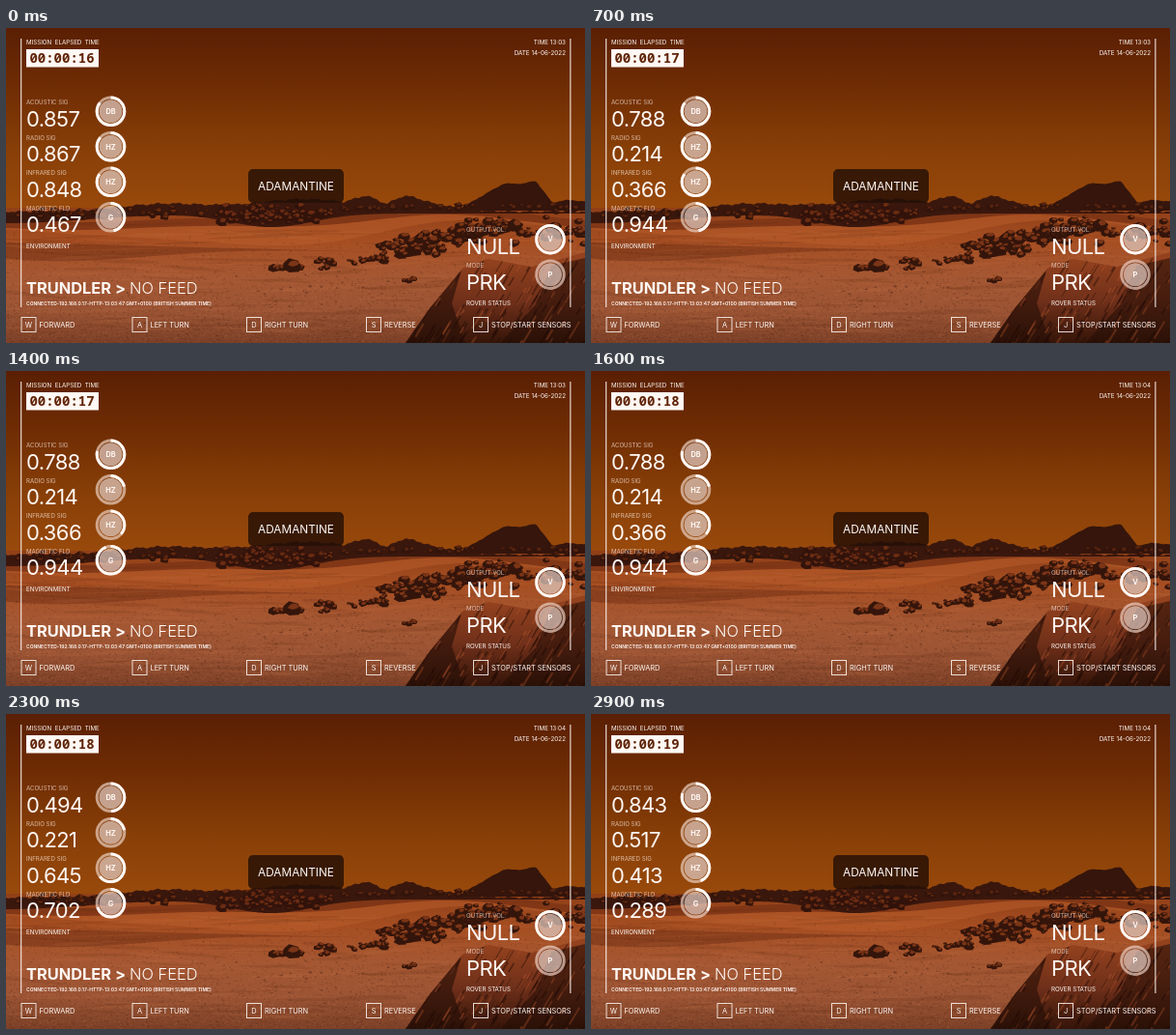
Recreate the animation shown at these times as an HTML page with a canvas. Size 600x326 px, loop 3 s.

```html
<!DOCTYPE html>
<html lang="en">
<head>
<meta charset="utf-8">
<title>Rover console</title>
<style>
html, body { margin: 0; width: 100%; height: 100%; overflow: hidden; background: #5c2103; }
canvas { display: block; width: 600px; height: 326px; }
</style>
</head>
<body>
<canvas id="stage"></canvas>
<script>
const W = 600, H = 326, LOOP = 3000, STEP = 100, TAU = Math.PI * 2;
const scale = Math.max(1, window.devicePixelRatio || 1);

function sizeCanvas(canvas) {
  canvas.width = W * scale;
  canvas.height = H * scale;
  const context = canvas.getContext('2d');
  context.scale(scale, scale);
  return context;
}

function randomFrom(seed) {
  return () => {
    seed = (seed * 1664525 + 1013904223) >>> 0;
    return seed / 4294967296;
  };
}

// ---------- landscape ----------
const landscape = document.createElement('canvas');
const bg = sizeCanvas(landscape);
const random = randomFrom(2024);
const spread = size => (random() + random() - 1) * size;

function vertical(top, bottom, ...colors) {
  const g = bg.createLinearGradient(0, top, 0, bottom);
  colors.forEach((color, i) => g.addColorStop(i / (colors.length - 1), color));
  return g;
}

// Fills the area between two curves y = top(x) and y = bottom(x)
function band(fill, top, bottom) {
  bg.beginPath();
  for (let x = 0; x <= W; x += 2) bg.lineTo(x, top(x));
  for (let x = W; x >= 0; x -= 2) bg.lineTo(x, Math.max(top(x), bottom(x)));
  bg.fillStyle = fill;
  bg.fill();
}

function polygon(fill, points) {
  bg.beginPath();
  points.forEach(([x, y]) => bg.lineTo(x, y));
  bg.fillStyle = fill;
  bg.fill();
}

const bump = (x, center, width) => Math.exp(-(((x - center) / width) ** 2));
const rough = x => Math.sin(x * 0.31) * 0.7 + Math.sin(x * 0.83) * 0.5;

function rock(x, y, r, dark, light) {
  const blob = (cx, cy, size, color) => {
    const corners = Array.from({ length: 7 }, (_, i) => {
      const reach = size * (0.7 + random() * 0.5);
      return [cx + Math.cos(i * TAU / 7) * reach, cy + Math.sin(i * TAU / 7) * reach * 0.65];
    });
    polygon(color, corners);
  };
  blob(x, y, r, dark);
  blob(x + r * 0.2, y - r * 0.25, r * 0.55, light);
}

// Stones strewn around a line from (x0, y0) to (x1, y1)
function strew(count, x0, y0, x1, y1, width, size, dark = '#34150b', light = '#7b3517') {
  for (let i = 0; i < count; i++) {
    const t = random();
    rock(x0 + (x1 - x0) * t + spread(width * 2), y0 + (y1 - y0) * t + spread(width),
      size * (0.35 + random() * 0.75), dark, light);
  }
}

function paintSky() {
  bg.fillStyle = vertical(0, 190, '#5a1f03', '#702d04', '#883f07', '#9a4a0c');
  bg.fillRect(0, 0, W, 200);
}

function paintSand() {
  bg.fillStyle = vertical(186, H, '#8f3f17', '#a64e22', '#a55732', '#9b5434', '#7c4027');
  bg.fillRect(0, 186, W, H - 186);
  const crest = x => 207 - 13 * bump(x, 440, 110) + 2 * Math.sin(x / 45);
  band('rgba(118,49,20,.65)', x => crest(x) - 8, crest);
  band('rgba(188,94,45,.5)', crest, x => crest(x) + 20 * bump(x, 280, 170));
  band('rgba(104,42,18,.45)', x => 222 + x / 40, x => 222 + x / 40 + 18 * bump(x, 40, 150));

  for (let i = 0; i < 130; i++) {
    const y = 200 + random() * 115;
    bg.fillStyle = i % 2 ? 'rgba(82,32,14,.13)' : 'rgba(212,126,78,.1)';
    bg.beginPath();
    bg.ellipse(random() * W, y, 15 + random() * 45, 0.6 + random() * 1.3, spread(0.12), 0, TAU);
    bg.fill();
  }
  for (let i = 0; i < 4500; i++) {
    bg.fillStyle = random() < 0.55 ? 'rgba(62,24,12,.25)' : 'rgba(222,142,98,.18)';
    bg.fillRect(random() * W, 205 + 121 * Math.sqrt(random()), 1.4, 0.9);
  }
}

function paintRidges() {
  const slope = (x, left, peak, right) =>
    Math.max(0, Math.min((x - left) / (peak - left), (right - x) / (right - peak)));
  const base = x => 190 - 8 * bump(x, 165, 65) - 13 * bump(x, 310, 75) - 8 * bump(x, 430, 45);
  const skyline = x => base(x) - 9 * slope(x, 350, 373, 395) - 8 * slope(x, 394, 413, 445) + rough(x);
  band('#3a170d', skyline, x => 192 + 14 * bump(x, 275, 60) + 10 * bump(x, 0, 120));
  const mesa = x => 187 - Math.min(26, 40 * slope(x, 470, 540, 566)) - 9 * slope(x, 535, 580, 720);
  band('#35150c', x => mesa(x) + rough(x) * 0.4, x => x > 470 ? 189 : 0);
  strew(120, 225, 193, 330, 192, 11, 6, '#32130b', '#6a2c13');
  strew(70, 20, 192, 205, 190, 6, 5, '#32140b', '#64290f');
  strew(45, 350, 186, 590, 187, 4, 5, '#32140b', '#572410');
}

function paintStones() {
  strew(110, 400, 232, 500, 205, 13, 7);
  strew(70, 490, 207, 600, 212, 16, 7);
  strew(30, 325, 244, 410, 237, 6, 5);
  strew(14, 275, 249, 320, 246, 3, 6);
  strew(6, 412, 261, 421, 261, 3, 6);
  strew(60, 130, 285, 420, 262, 28, 1.5, '#6c341d', '#93583a');
  rock(296, 246, 11, '#34150b', '#7b3517');
}

function paintBoulder() {
  const outline = [[414, H], [440, 289], [474, 248], [500, 239], [545, 247], [600, 232], [600, H]];
  bg.save();
  polygon(vertical(238, H, '#94421e', '#70301a', '#351509'), outline);
  bg.clip();
  polygon('rgba(40,15,8,.62)', [[410, H], [440, 286], [473, 247], [462, 285], [476, H]]);
  polygon('rgba(35,13,7,.55)', [[512, H], [550, 285], [565, 246], [600, 238], [600, H]]);
  // Cracks and lit edges running down the face
  for (let i = 0; i < 170; i++) {
    const x = 420 + random() * 190, y = 238 + random() * 90, length = 4 + random() * 14;
    bg.strokeStyle = i % 3 ? 'rgba(32,11,6,.45)' : 'rgba(190,92,48,.32)';
    bg.lineWidth = 0.6 + random() * 1.8;
    bg.beginPath();
    bg.moveTo(x, y);
    bg.lineTo(x - length * 0.6, y + length);
    bg.stroke();
  }
  bg.restore();
}

// ---------- console ----------
const ctx = sizeCanvas(document.getElementById('stage'));
const SANS = 'Inter, Roboto, sans-serif';
const WHITE = '#fff8f4', SOFT = 'rgba(255,240,230,.72)';

function text(str, x, y, size, { weight = 400, color = WHITE, align = 'left',
  family = SANS, spacing = 0 } = {}) {
  ctx.font = `${weight} ${size}px ${family}`;
  ctx.textAlign = align;
  ctx.fillStyle = color;
  ctx.letterSpacing = spacing + 'px';
  ctx.fillText(str, x, y);
}

function dial(x, y, label, value) {
  const arc = (radius, end) => {
    ctx.beginPath();
    ctx.arc(x, y, radius, -TAU / 4, -TAU / 4 + end * TAU);
  };
  ctx.fillStyle = 'rgba(222,200,190,.74)';
  arc(12, 1);
  ctx.fill();
  ctx.lineWidth = 3;
  ctx.strokeStyle = 'rgba(238,212,200,.68)';
  arc(14.3, 1);
  ctx.stroke();
  ctx.strokeStyle = WHITE;
  arc(14.3, value);
  ctx.stroke();
  text(label, x, y + 2.7, 7.4, { weight: 700, align: 'center' });
}

function reading(x, y, label, value) {
  text(label, x, y - 22.8, 6.1, { color: SOFT });
  text(value, x, y, 22, { spacing: -0.6 });
}

const sensors = [
  ['ACOUSTIC SIG', 'DB', [0.857, 0.788, 0.494, 0.843]],
  ['RADIO SIG', 'HZ', [0.867, 0.214, 0.221, 0.517]],
  ['INFRARED SIG', 'HZ', [0.848, 0.366, 0.645, 0.413]],
  ['MAGNETIC FLD', 'G', [0.467, 0.944, 0.702, 0.289]]
];
const keys = [
  ['W', 'FORWARD', 16], ['A', 'LEFT TURN', 131], ['D', 'RIGHT TURN', 249.5],
  ['S', 'REVERSE', 373.5], ['J', 'STOP/START SENSORS', 484.5]
];

// Number of one-second ticks passed, the first one at `first`
const ticks = (time, first) => Math.max(0, Math.floor((time - first) / 1000) + 1);
const easeOut = p => 1 - (1 - p) ** 3;

function drawSensors(time) {
  const first = 700, index = ticks(time, first);
  const since = time - first - (index - 1) * 1000;
  const progress = index ? easeOut(Math.min(1, since / 400)) : 1;
  sensors.forEach(([label, unit, values], i) => {
    const y = 101.8 + i * 36.5;
    const from = values[Math.max(0, index - 1)], to = values[index];
    reading(21, y, label, to.toFixed(3));
    dial(108.5, y - 15.5, unit, from + (to - from) * progress);
  });
}

function drawHeader(time) {
  text('MISSION  ELAPSED  TIME', 21, 17.2, 6.2);
  ctx.fillStyle = WHITE;
  ctx.fillRect(21, 22, 75, 18.5);
  text('00:00:' + (16 + ticks(time, 500)), 58, 36.2, 14,
    { weight: 700, color: '#602408', align: 'center', family: '"Noto Sans Mono", monospace' });
  text(time < 1500 ? 'TIME 13:03' : 'TIME 13:04', 580, 17.2, 6.3, { align: 'right' });
  text('DATE 14-06-2022', 580, 27.8, 6.3, { align: 'right' });
}

function drawStatus() {
  text('ENVIRONMENT', 21, 227.7, 6.2);
  reading(477, 234.2, 'OUTPUT VOL.', 'NULL');
  reading(477, 270.8, 'MODE', 'PRK');
  dial(564, 218.7, 'V', 1);
  dial(564, 255.2, 'P', 0);
  text('ROVER STATUS', 477, 287, 6.2);
  text('TRUNDLER >', 21, 275, 16.4, { weight: 700 });
  text('NO FEED', 128, 275, 16.4, { weight: 300 });
  text('CONNECTED-192.168.0.17-HTTP-13:03:47 GMT+0100 (BRITISH SUMMER TIME)',
    21, 287, 5, { weight: 600 });
}

function drawKeys() {
  ctx.strokeStyle = 'rgba(255,248,244,.85)';
  ctx.lineWidth = 1;
  keys.forEach(([key, action, x]) => {
    ctx.strokeRect(x, 299.5, 15, 15);
    text(key, x + 7.5, 309.8, 7.4, { align: 'center' });
    text(action, x + 18.5, 310, 7.4);
  });
}

function draw(time) {
  ctx.drawImage(landscape, 0, 0, W, H);
  ctx.fillStyle = WHITE;
  ctx.fillRect(15.2, 11, 1, 278);
  ctx.fillRect(584.4, 11, 1, 278);
  drawHeader(time);
  drawSensors(time);
  drawStatus();
  drawKeys();
  ctx.beginPath();
  ctx.roundRect(251, 146, 99, 35, 5);
  ctx.fillStyle = 'rgba(34,14,5,.8)';
  ctx.fill();
  text('ADAMANTINE', 300.5, 167.6, 11.8, { align: 'center' });
}

function loop() {
  const time = performance.now() % LOOP;
  draw(Math.floor(time / STEP) * STEP);
  requestAnimationFrame(loop);
}

paintSky();
paintSand();
paintRidges();
paintStones();
paintBoulder();
loop();
</script>
</body>
</html>
```
